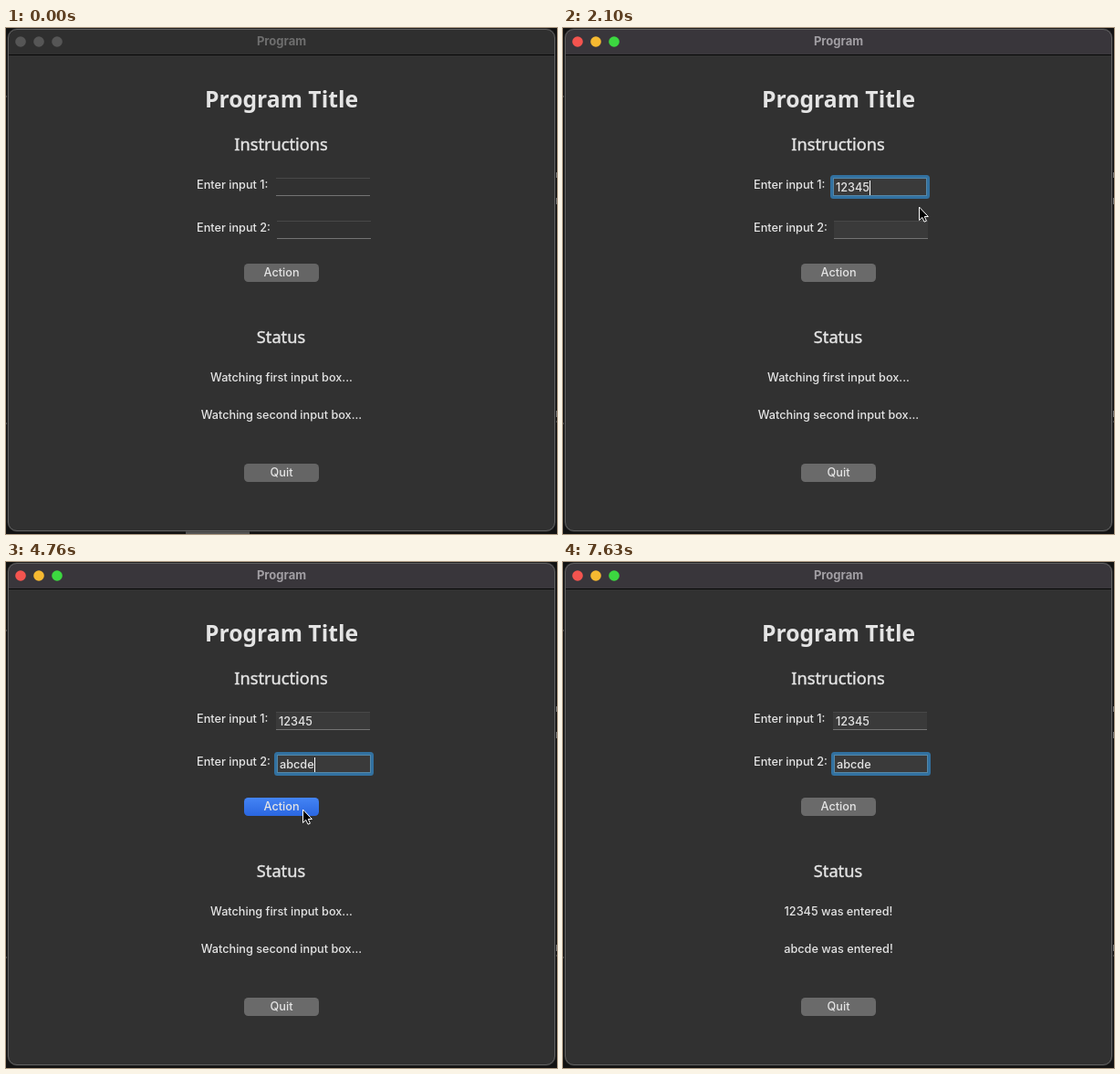
An HTML page that plays this animation: 604x554 px, repeating every 7840 ms.

```html
<!DOCTYPE html>
<html lang="en">
<head>
<meta charset="utf-8">
<title>Program</title>
<style>
  html, body { margin: 0; width: 100%; height: 100%; overflow: hidden; background: #121212; }
  svg { display: block; }
  text { font: 500 12.7px Inter, "Liberation Sans", sans-serif; fill: #e4e4e4; white-space: pre; }
  .mid { text-anchor: middle; }
  .head { font: 18.2px "Noto Sans", "Open Sans", sans-serif; stroke: #e4e4e4; stroke-width: .4; }
  #heading { font-size: 24.7px; font-weight: 700; stroke: none; }
  #caption { font-size: 13px; font-weight: 700; fill: #6e6e6e; }
  .active #caption { fill: #a19ea3; }
  #bar { fill: #2f2f2f; }
  .active #bar { fill: #39363b; }
  .light { fill: #565656; }
  .active .light { fill: var(--c); }
  .button { fill: #656565; }
  .active .button { fill: #6a6a6a; }
  .button.pressed { fill: url(#blue); }
  .box { fill: #313131; }
  .active .box { fill: #3a3a3a; }
  .ring { fill: none; stroke: #3271a0; stroke-width: 4; }
  .caret { fill: #fff; }
</style>
</head>
<body>
<svg id="stage" width="604" height="554" viewBox="0 0 604 554">
  <defs>
    <linearGradient id="blue" x2="0" y2="1">
      <stop stop-color="#4484f5"/><stop offset="1" stop-color="#2a66e0"/>
    </linearGradient>
    <path id="beamShape" d="M-4-7.5Q0-7.5 0-5Q0-7.5 4-7.5M0-5V5M-4 7.5Q0 7.5 0 5Q0 7.5 4 7.5M-2 2.5H2"/>
  </defs>
  <rect id="dock" x="197" y="551" width="70" height="3" fill="#555"/>
  <path d="M0 75h1M0 433h1M603.5 158v6M603.5 186v7M603.5 419v7M603 431h1" stroke="#777"/>
  <rect x="1.5" y=".5" width="601" height="551" rx="10" fill="#313131"/>
  <path id="bar" d="M2 29V11Q2 1 12 1H592Q602 1 602 11V29Z"/>
  <path d="M2 29.5H602" stroke="#080808"/>
  <rect x="2.5" y="1.5" width="599" height="549" rx="9.5" fill="none" stroke="#606060"/>
  <circle class="light" cx="16" cy="15" r="5.8" style="--c:#f4544f"/>
  <circle class="light" cx="36" cy="15" r="5.8" style="--c:#f6b931"/>
  <circle class="light" cx="56" cy="15" r="5.8" style="--c:#3cd840"/>
  <text id="caption" class="mid" x="302" y="19">Program</text>
  <text id="heading" class="mid head" x="302" y="87">Program Title</text>
  <text class="mid head" x="301.5" y="134">Instructions</text>
  <text x="209" y="176">Enter input 1:</text>
  <text x="209" y="223">Enter input 2:</text>
  <g id="field1" transform="translate(296 164)"></g>
  <g id="field2" transform="translate(297 211)"></g>
  <rect id="action" class="button" x="261" y="258" width="82" height="20" rx="4.5"/>
  <text class="mid" x="302" y="272">Action</text>
  <text class="mid head" x="301.5" y="345">Status</text>
  <text id="status1" class="mid" x="302" y="387"></text>
  <text id="status2" class="mid" x="302" y="428"></text>
  <rect class="button" x="261" y="477" width="82" height="20" rx="4.5"/>
  <text class="mid" x="302" y="491">Quit</text>
  <path id="arrow" d="M.5 0V14.5L3.8 11.4L6 16.2L8.4 15.2L6.3 10.5H10.4Z" fill="#000" stroke="#fff"/>
  <g id="beam" fill="none">
    <use href="#beamShape" stroke="#fff" stroke-width="3"/>
    <use href="#beamShape" stroke="#000" stroke-width="1.2"/>
  </g>
</svg>
<script>
const LOOP = 7840, STEP = 70, BLINK = 565;
const ACTIVATE = 630, PRESS = 4690, RELEASE = 4830;
const FOCUS1 = 700, FOCUS2 = 2380, TYPE1 = 1260, TYPE2 = 2460;
const $ = id => document.getElementById(id);
const show = (el, on) => { el.style.display = on ? '' : 'none'; };

function makeField(id, value, focus, blur, typeStart, keyGap) {
  const g = $(id);
  g.innerHTML = `<rect class="box" width="103" height="20"/>
    <path d="M0 .5H103" stroke="#484848"/><path d="M0 19.5H103" stroke="#737373"/>
    <g class="focus"><rect class="ring" x="-1" y="-1" width="105" height="22" rx="1.5"/>
    <rect x=".5" y=".5" width="102" height="19" fill="none" stroke="#5487a8"/></g>
    <text x="3" y="15"></text><rect class="caret" y="3" width="1" height="16"/>`;
  const [ring, text, caret] = ['.focus', 'text', '.caret'].map(s => g.querySelector(s));
  return t => {
    const typed = Math.max(0, Math.min(value.length, 1 + Math.floor((t - typeStart) / keyGap)));
    const focused = t >= focus && t < blur;
    const since = typed ? typeStart + (typed - 1) * keyGap : focus;
    text.textContent = value.slice(0, typed);
    ring.setAttribute('opacity', focused ? Math.min(1, (t - focus + 140) / 210) : 0);
    caret.setAttribute('x', 3 + Math.round(text.getComputedTextLength()));
    show(caret, focused && Math.floor((t - since) / BLINK) % 2 === 0);
  };
}

const fields = [
  makeField('field1', '12345', FOCUS1, FOCUS2, TYPE1, 140),
  makeField('field2', 'abcde', FOCUS2, LOOP, TYPE2, 168)
];

// Each pointer move is a curve from a to b bent by c, then a rest until it hides.
const moves = [
  { start: 70, end: 490, hide: TYPE1, a: [583, 536], c: [420, 150], b: [320, 180] },
  { start: 1890, end: FOCUS2, hide: TYPE2, a: [321, 180], c: [463, 195], b: [320, 229] },
  { start: 3220, end: 4410, hide: 5950, a: [325, 238], c: [354, 251], b: [325, 271] },
  { start: 5950, end: 7600, hide: 7600, a: [325, 271], c: [422, 391], b: [314, 556] }
];

function pointerAt(t) {
  const m = moves.find(m => t >= m.start && t < m.hide);
  if (!m) return null;
  const u = Math.min(1, (t - m.start) / (m.end - m.start)), v = 1 - u;
  return [0, 1].map(i => Math.round(v * v * m.a[i] + 2 * u * v * m.c[i] + u * u * m.b[i]));
}

const inField = ([x, y]) => x > 296 && x < 400 && (y > 164 && y < 184 || y > 211 && y < 231);

function draw(t) {
  $('stage').classList.toggle('active', t >= ACTIVATE);
  show($('dock'), t < ACTIVATE);
  fields.forEach(update => update(t));
  $('action').classList.toggle('pressed', t >= PRESS && t < RELEASE);
  const done = t >= RELEASE;
  $('status1').textContent = done ? '12345 was entered!' : 'Watching first input box...';
  $('status2').textContent = done ? 'abcde was entered!' : 'Watching second input box...';
  const p = pointerAt(t), beam = p && inField(p);
  show($('arrow'), p && !beam);
  show($('beam'), beam);
  if (p) $(beam ? 'beam' : 'arrow').setAttribute('transform', `translate(${p})`);
}

const start = performance.now();
function tick() {
  const t = (performance.now() - start) % LOOP;
  draw(Math.floor(t / STEP) * STEP);
  requestAnimationFrame(tick);
}
tick();
</script>
</body>
</html>
```
